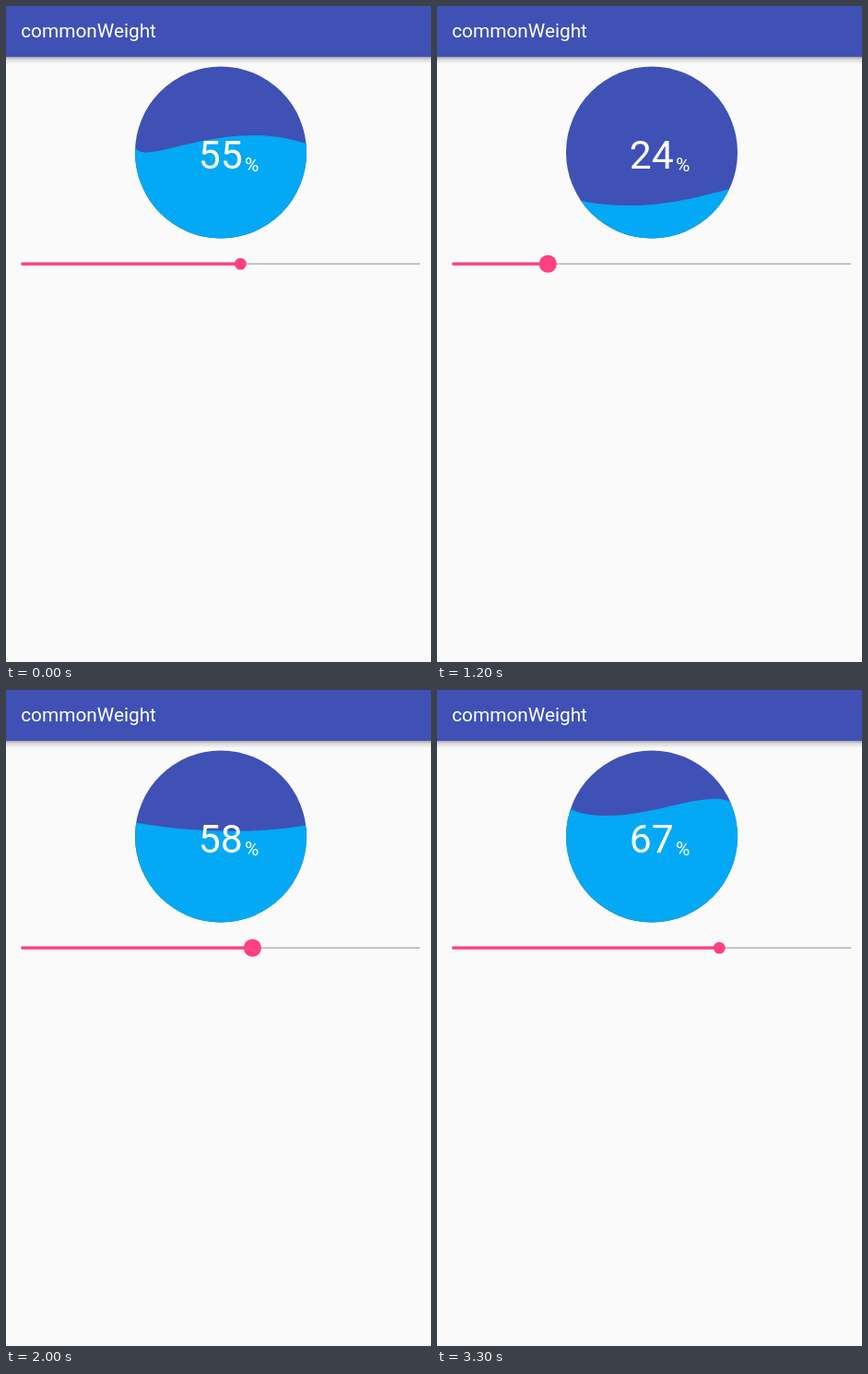
Animation, 461 px wide and 710 px high, one loop 3.4 s. Source, as an HTML page:

```html
<!DOCTYPE html>
<html lang="en">
<head>
<meta charset="utf-8">
<title>Wave progress</title>
<style>
  html, body { margin: 0; width: 100%; height: 100%; overflow: hidden; background: #fafafa; }
  svg { display: block; width: 461px; height: 710px; }
  text { fill: #fff; font-family: Roboto, "Noto Sans", sans-serif; }
</style>
</head>
<body>
<svg viewBox="0 0 461 710">
  <defs>
    <linearGradient id="shade" x2="0" y2="1">
      <stop offset="0" stop-opacity=".36"/>
      <stop offset=".35" stop-opacity=".13"/>
      <stop offset="1" stop-opacity="0"/>
    </linearGradient>
    <clipPath id="disc"><circle cx="233" cy="158.5" r="93"/></clipPath>
  </defs>

  <rect y="55" width="461" height="8" fill="url(#shade)"/>
  <rect width="461" height="55" fill="#3f51b5"/>
  <text x="16.2" y="34.2" font-size="20.8">commonWeight</text>

  <circle cx="233" cy="158.5" r="93" fill="#3f51b5"/>
  <path id="wave" clip-path="url(#disc)" fill="#03a9f4"/>
  <text id="value" x="208.8" y="175.8" font-size="42.7"></text>
  <text x="259" y="179" font-size="21">%</text>

  <rect x="16.5" y="278.5" width="432.7" height="1.2" fill="#a3a3a3"/>
  <rect id="bar" x="16.5" y="277.4" height="3.4" fill="#ff4081"/>
  <circle id="thumb" cy="279.1" fill="#ff4081"/>
</svg>
<script>
  const LOOP = 3400, STEP = 100;
  const LEFT = 140, SIZE = 186, BOTTOM = 251.5;
  const SWING = 32, GAP = 95, SWEEP = 2000;
  const DRAG_START = 800, DRAG_END = 2400;
  // Slider value at each step of the drag
  const drag = [55, 49, 39, 29, 24, 26, 30, 35, 40, 45, 50, 54, 58, 62, 65, 67, 67];

  const [wave, value, bar, thumb] =
    ["wave", "value", "bar", "thumb"].map(id => document.getElementById(id));

  function percentAt(t) {
    const i = Math.round((t - DRAG_START) / STEP);
    return drag[Math.max(0, Math.min(drag.length - 1, i))];
  }

  // Both control points slide right, then back, at constant speed
  function wavePath(t, percent) {
    const y = BOTTOM - SIZE * percent / 100;
    const x1 = LEFT + SIZE * (1 - Math.abs(1 - t / SWEEP));
    const right = LEFT + SIZE;
    return `M${LEFT} ${y}C${x1} ${y + SWING} ${x1 + GAP} ${y - SWING} ${right} ${y}` +
           `V${BOTTOM + 1}H${LEFT}Z`;
  }

  function draw(t) {
    const percent = percentAt(t);
    const length = 432.5 * percent / 100;
    const pressed = t >= DRAG_START && t < DRAG_END;
    wave.setAttribute("d", wavePath(t, percent));
    value.textContent = percent;
    bar.setAttribute("width", length);
    thumb.setAttribute("cx", 16.5 + length);
    thumb.setAttribute("r", pressed ? 9.6 : 6.4);
  }

  const start = performance.now();
  function tick() {
    const t = (performance.now() - start) % LOOP;
    draw(Math.floor(t / STEP) * STEP);
    requestAnimationFrame(tick);
  }
  tick();
</script>
</body>
</html>
```
